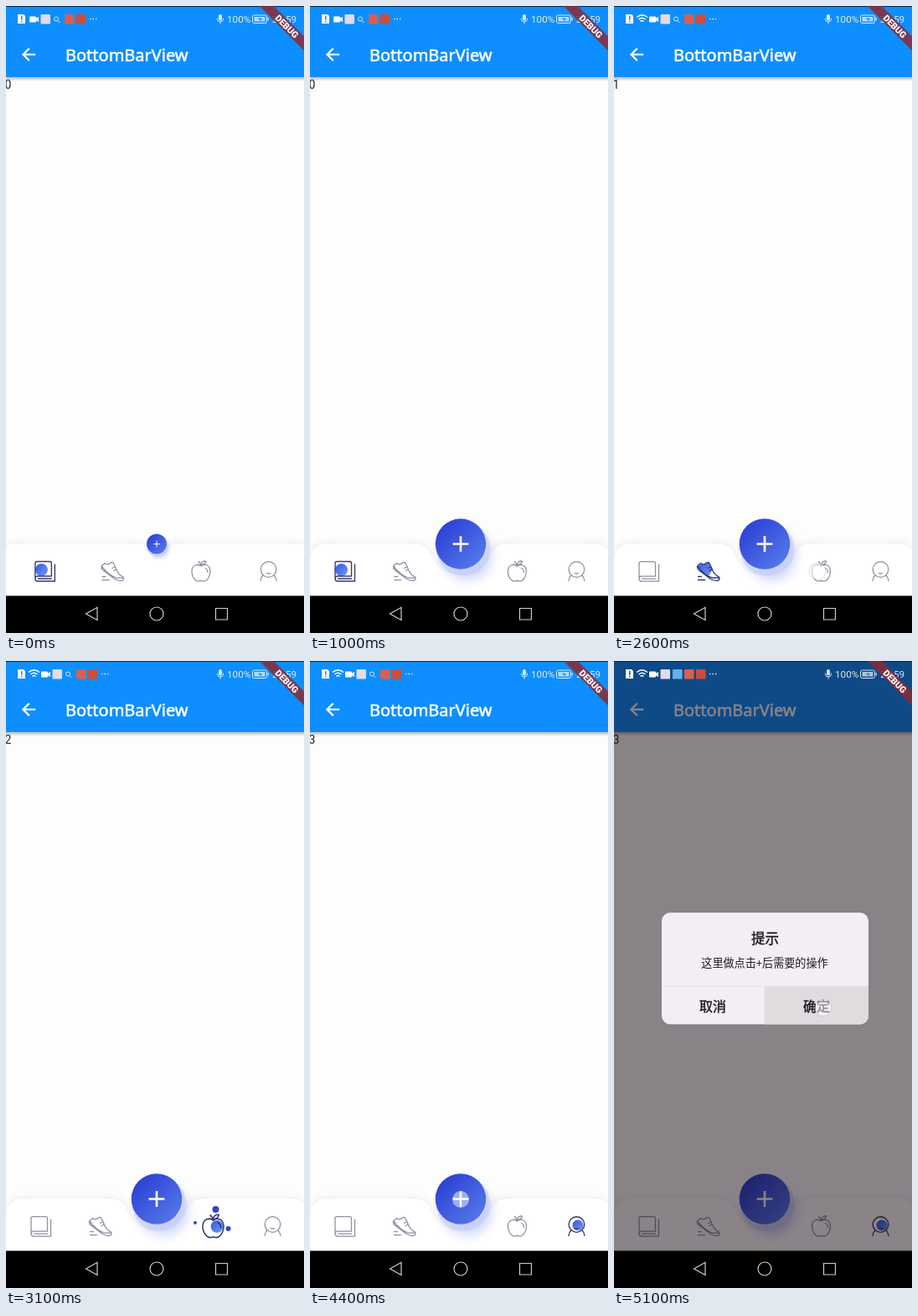
Write an HTML page that moves like this. It is 356 px wide and 750 px high and loops after 5.2 s.

```html
<!DOCTYPE html>
<html lang="en">
<head>
<meta charset="utf-8">
<title>Bottom bar</title>
<style>
  html, body { margin: 0; width: 100%; height: 100%; overflow: hidden; background: #fdfdfd; }
  svg { display: block; width: 356px; height: 750px; }
  text { font-family: Roboto, sans-serif; }
  .title { font: 20px "Noto Sans", sans-serif; fill: #fff; stroke: #fff; stroke-width: .55; }
  .cjk { font-family: "Noto Sans CJK SC", "Noto Sans CJK", sans-serif; text-anchor: middle; fill: #1d1b20; }
  .strong { stroke: #1d1b20; stroke-width: .4; }
  .ink { fill: none; stroke: #8f8da2; stroke-width: 1.25; stroke-linecap: round; stroke-linejoin: round; }
  .tint { fill: url(#blue); visibility: hidden; }
  .sel .ink { stroke: #32386c; stroke-width: 1.35; }
  .sel .tint { visibility: visible; }
  .dot { fill: #3346c2; }
  .nav { fill: none; stroke: #dcc6d2; stroke-width: 1.2; }
</style>
</head>
<body>
<svg viewBox="0 0 356 750">
  <defs>
    <linearGradient id="blue" x2="1" y2="1"><stop stop-color="#3658dc"/><stop offset="1" stop-color="#6f98f4"/></linearGradient>
    <linearGradient id="fabFill" x2="1" y2="1"><stop stop-color="#2638d0"/><stop offset="1" stop-color="#5a80ee"/></linearGradient>
    <linearGradient id="edge" x2="0" y2="1"><stop stop-color="#223" stop-opacity=".32"/><stop offset="1" stop-color="#223" stop-opacity="0"/></linearGradient>
    <filter id="lift" x="-10%" y="-60%" width="120%" height="220%"><feDropShadow dx="0" dy="-1" stdDeviation="5" flood-color="#446" flood-opacity=".08"/></filter>
    <filter id="soft" x="-60%" y="-60%" width="220%" height="220%"><feGaussianBlur stdDeviation="7"/></filter>
    <clipPath id="card"><rect x="57" y="301" width="247" height="133.500" rx="10"/></clipPath>
  </defs>

  <rect width="356" height="750" fill="#fdfdfd"/>
  <text id="page" x="-1.500" y="98.700" font-size="14" fill="#222"></text>

  <rect y="85" width="356" height="5" fill="url(#edge)"/>
  <rect width="356" height="85" fill="#0e8eff"/>
  <path d="M20 11H7.830l5.590-5.590L12 4l-8 8 8 8 1.410-1.410L7.830 13H20z" transform="translate(15 46)" fill="#fff" stroke="#fff" stroke-width=".3"/>
  <text class="title" x="71" y="66">BottomBarView</text>

  <path id="bar" fill="#fff" filter="url(#lift)"/>
  <g class="tab">
    <g class="art">
      <circle class="tint" cx="-4" cy="-2" r="7.500"/>
      <path class="ink" d="M-11.500 8.500V-10a2 2 0 0 1 2-2H6a2 2 0 0 1 2 2V5.500H-8.500a3 3 0 0 0 0 6H12V-8.500M-8 8.500H8"/>
    </g>
  </g>
  <g class="tab">
    <g class="art">
      <path class="tint" d="M-12.500-6L-8-9.500Q-4-7 0-11.500L3.500-6 5-2 1 5Q-6 2-12.500-6Z"/>
      <path class="ink" d="M-9-10L-13-6.500Q-13.500-4-11.500-2L3 9Q6 11 11.500 11 14.500 9.500 13 6.500 8 4 6 0L1.500-10Q0-12-2-10.500-5-7-9-10ZM-12.500-6Q-4 5 5 7.500H13M0-4L3-5.500M1.500-1L4.500-2.500M-12 6h4M-12 10h8"/>
    </g>
  </g>
  <g class="tab">
    <g class="art">
      <circle class="tint" cx="4" cy="0" r="6.500"/>
      <path class="ink" d="M0-6.500C3-9.500 11-9 11 0 11 7 6 12 3 11.500Q0 10.500-3 11.500C-6 12-11 7-11 0-11-9-3-9.500 0-6.500ZQ0-9-3-12M0-8Q1-13 6-12.500 5-8 0-8M5-4Q8-3 8 1"/>
    </g>
  </g>
  <g class="tab">
    <g class="art">
      <circle class="tint" cx="1.500" cy="-1.500" r="6.500"/>
      <circle class="ink" cy="-2.500" r="9.300"/>
      <path class="ink" d="M-2.300 2Q0 3 2.300 2M-9.500 11Q-9 6.500-6.500 4.500M9.500 11Q9 6.500 6.500 4.500"/>
    </g>
  </g>

  <g id="fab">
    <circle cx="8" cy="14" r="29" fill="#4058e8" opacity=".26" filter="url(#soft)"/>
    <circle cx="3" cy="6" r="32.500" fill="#c8d2fa" opacity=".65"/>
    <circle r="30.300" fill="url(#fabFill)"/>
    <path d="M-9.400 0H9.400M0-9.400V9.400" stroke="#fff" stroke-width="2.600"/>
  </g>

  <rect id="shade" width="356" height="706" fill="#12040c"/>
  <g id="dialog">
    <g clip-path="url(#card)">
      <rect x="57" y="301" width="247" height="134" fill="#f3eef5"/>
      <rect id="okBack" x="180" y="389" width="124" height="46" fill="#e1dbe0"/>
      <path d="M57 389H304M180 389V435" stroke="#e3e0ea" stroke-width="1"/>
    </g>
    <text class="cjk strong" x="180.500" y="338" font-size="16.500">提示</text>
    <text class="cjk" x="180" y="366" font-size="13.100">这里做点击+后需要的操作</text>
    <text class="cjk strong" x="118" y="419" font-size="16">取消</text>
    <text class="cjk strong" x="242" y="419" font-size="16">确定</text>
  </g>

  <rect width="356" height="1" fill="#0a2340"/>
  <g fill="#fff">
    <path d="M14 10h7l2 2v9h-9zM18 12v5h1.500v-5zM18 18v1.500h1.500V18z" fill-rule="evenodd"/>
    <g id="wifi" fill="none" stroke="#fff" stroke-width="1.300">
      <path d="M27 13.500Q33.500 8 40 13.500M29.500 16Q33.500 12.500 37.500 16M31.500 18.500Q33.500 16.500 35.500 18.500"/>
    </g>
    <g id="notes">
      <path d="M29 12.500h6a1 1 0 0 1 1 1v1l3-1.500v6l-3-1.500v1a1 1 0 0 1-1 1h-6a1 1 0 0 1-1-1v-5a1 1 0 0 1 1-1z"/>
      <rect x="41.500" y="10" width="11.500" height="11.500" rx="1" fill="#e3dbea"/>
      <path id="lens" d="M62 17.500l2.500 2.500M62.500 15.500a2.500 2.500 0 1 1-5 0 2.500 2.500 0 0 1 5 0z" fill="none" stroke="#cfe8ff"/>
      <rect id="note" x="56" y="10" width="11.500" height="11.500" rx="1" fill="#63b0ee"/>
      <rect x="70" y="10" width="11.500" height="11.500" rx="1" fill="#d9604c"/>
      <rect x="84" y="10" width="11.500" height="11.500" rx="1" fill="#c94f3a"/>
      <path d="M100 15.500h1.500M103.500 15.500h1.500M107 15.500h1.500" stroke="#d5eaff" stroke-width="1.500"/>
    </g>
    <g opacity=".85">
      <rect x="254" y="10" width="4" height="7.500" rx="2"/>
      <path d="M252.500 14.500v1a3.500 3.500 0 0 0 7 0v-1M256 19v2.500" fill="none" stroke="#fff"/>
      <text x="264" y="20" font-size="11.700">100%</text>
      <rect x="294.500" y="11" width="17" height="9.500" rx="2" fill="none" stroke="#fff"/>
      <path d="M296.500 13h13v5.500h-13zM312.500 14h1.500v3.500h-1.500z" opacity=".8"/>
      <path d="M300 16l4-2v1.500h3l-4 2.500v-2z" fill="#0e8eff"/>
      <text x="318" y="20" font-size="11.700">22:59</text>
    </g>
  </g>
  <g transform="translate(359 1) rotate(45)">
    <rect x="-42" y="27" width="84" height="12" fill="#8c2a34" fill-opacity=".85"/>
    <text x="0" y="37" font-size="10.700" font-weight="900" text-anchor="middle" fill="#fff">DEBUG</text>
  </g>

  <rect y="705.500" width="356" height="45"/>
  <path class="nav" d="M95.500 727L109 719.500V734.500ZM250.500 720.500h14v13.500h-14z"/>
  <circle class="nav" cx="180" cy="727" r="8"/>
  <circle id="touch" r="10" fill="#fff" fill-opacity=".5" stroke="#8890b0" stroke-opacity=".3"/>
</svg>

<script>
const LOOP = 5200, STEP = 100, WIDTH = 360, BAR_Y = 643.5, PAD = 6, GAP = 64, NOTCH = 38;
const OPEN_FROM = 0.31, TAP = 400;
const picks = [-9999, 1520, 2700, 3500];      // tap time of each tab
const touches = [[1400, 1600, 113, 677], [2600, 2700, 243, 676], [3400, 3500, 318, 676],
                 [4400, 4500, 180, 644], [5000, 5200, 250, 415]];
// x, y, radius, and the part of the tap in which the dot grows
const dotSpec = [[3, -20.5, 4, 0.2, 1], [-21.5, -4.5, 2, 0.5, 0.8], [18, 2.5, 3, 0.5, 0.6]];

const $ = id => document.getElementById(id);
const clamp = v => Math.max(0, Math.min(1, v));
const show = (el, on) => { el.style.visibility = on ? 'visible' : 'hidden'; };

// cubic-bezier(.4, 0, .2, 1)
function ease(x) {
  x = clamp(x);
  let lo = 0, hi = 1;
  for (let i = 0; i < 24; i++) {
    const u = (lo + hi) / 2, v = 1 - u;
    if (1.2 * v * v * u + 0.6 * v * u * u + u ** 3 < x) lo = u; else hi = u;
  }
  return 3 * (1 - lo) * lo * lo + lo ** 3;
}
const span = (p, a, b) => ease((p - a) / (b - a));

function arc(cx, cy, r, from, sweep) {
  const at = deg => {
    const a = deg * Math.PI / 180;
    return (cx + r * Math.cos(a)).toFixed(2) + ' ' + (cy + r * Math.sin(a)).toFixed(2);
  };
  return `L${at(from)}A${r} ${r} 0 0 ${sweep > 0 ? 1 : 0} ${at(from + sweep)}`;
}

function barPath(s) {
  const r = NOTCH * s, c = r / 2, mid = WIDTH / 2, y = BAR_Y + c;
  const side = r + c - 0.08 * r;
  return `M0 706` + arc(c, y, c, 180, 90) + arc(mid - side, y, c, 270, 70) +
    arc(mid, BAR_Y, r, 160, -140) + arc(mid + side, y, c, 200, 70) +
    arc(WIDTH - c, y, c, 270, 90) + `L${WIDTH} 706Z`;
}

const tabs = [...document.querySelectorAll('.tab')].map(el => ({
  el,
  art: el.querySelector('.art'),
  dots: dotSpec.map(([x, y]) => {
    const dot = document.createElementNS('http://www.w3.org/2000/svg', 'circle');
    dot.setAttribute('class', 'dot');
    dot.setAttribute('cx', x);
    dot.setAttribute('cy', y);
    return el.appendChild(dot);
  })
}));

function drawTabs(t, s) {
  const cell = (WIDTH - 2 * PAD - GAP * s) / 4;
  const current = picks.filter(p => t >= p + TAP).length - 1;
  tabs.forEach(({ el, art, dots }, i) => {
    const x = PAD + cell * (i + 0.5) + (i > 1 ? GAP * s : 0);
    const p = clamp(1 - Math.abs((t - picks[i]) / TAP - 1));
    el.setAttribute('transform', `translate(${x} 676.5)`);
    el.classList.toggle('sel', i === current);
    art.setAttribute('transform', `scale(${1 + 0.136 * span(p, 0.1, 1)})`);
    dots.forEach((dot, k) => {
      const [, , r, a, b] = dotSpec[k];
      dot.setAttribute('r', r * span(p, a, b));
    });
  });
  $('page').textContent = current;
}

function draw(t) {
  const s = ease(OPEN_FROM + Math.max(0, t - 400) / 1000);
  $('bar').setAttribute('d', barPath(s));
  $('fab').setAttribute('transform', `translate(180 ${BAR_Y}) scale(${s})`);
  drawTabs(t, s);

  const fade = clamp((t - 4500) / 200);
  $('shade').setAttribute('opacity', 0.49 * fade);
  $('dialog').setAttribute('opacity', fade);
  $('okBack').setAttribute('opacity', t >= 5000 ? 1 : 0);

  const online = t >= 1500, fresh = t >= 4800;
  show($('wifi'), online);
  show($('lens'), !fresh);
  show($('note'), fresh);
  $('notes').setAttribute('transform', `translate(${online ? 14 : 0} 0)`);

  const hit = touches.find(([a, b]) => t >= a && t < b);
  show($('touch'), hit);
  if (hit) $('touch').setAttribute('transform', `translate(${hit[2]} ${hit[3]})`);
}

const begin = performance.now();
function tick() {
  const t = (performance.now() - begin) % LOOP;
  draw(Math.floor(t / STEP) * STEP);
  requestAnimationFrame(tick);
}
tick();
</script>
</body>
</html>
```
